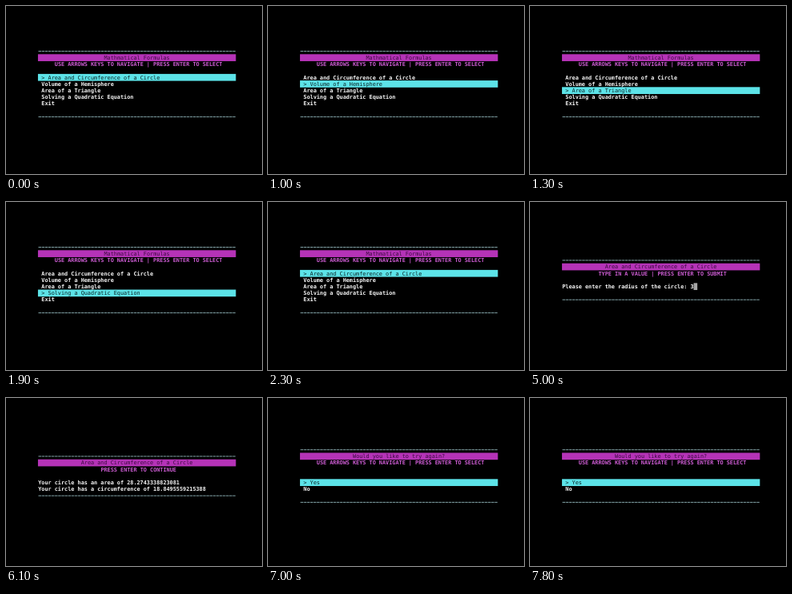
Animation, 320 px wide and 210 px high, one loop 8000 ms. Source, as an HTML page:

```html
<!DOCTYPE html>
<html lang="en">
<head>
<meta charset="utf-8">
<title>Terminal formulas</title>
<style>
  html, body { margin: 0; width: 100%; height: 100%; overflow: hidden; background: #000; }
  svg { display: block; width: 320px; height: 210px; }
  text {
    font: 6.835px "DejaVu Sans Mono", monospace;
    white-space: pre;
    text-rendering: geometricPrecision;
  }
  .bold { font-weight: bold; }
</style>
</head>
<body>
<svg id="stage" viewBox="0 0 320 210"></svg>
<script>
const LOOP = 8000;
const COLS = 60, LEFT = 40.2, TOP = 52.3, CELL = 4.115, ROW = 8.21;
const BLEED = 0.25; // highlights reach slightly past their cells
const MAGENTA = "#b533b7", PINK = "#cc5cd2", CYAN = "#5ce3e8";
const WHITE = "#f6f6f6", RULE = "#83a4a8", INK = "#0a2426", TITLE_INK = "#3c0a40";

const NAVIGATE = "USE ARROWS KEYS TO NAVIGATE | PRESS ENTER TO SELECT";
const CIRCLE = "Area and Circumference of a Circle";
const FORMULAS = [
  CIRCLE,
  "Volume of a Hemisphere",
  "Area of a Triangle",
  "Solving a Quadratic Equation",
  "Exit"
];
const PROMPT = "Please enter the radius of the circle: ";
const DOWN_KEYS = [1000, 1300, 1600, 2000, 2300];
const ENTER = 3500, TYPED = 5000, RESULT = 5300, AGAIN = 6900;

const stage = document.getElementById("stage");
const px = n => n.toFixed(2);

function put(row, col, str, fill, bold) {
  const safe = str.replace(/&/g, "&amp;").replace(/</g, "&lt;").replace(/>/g, "&gt;");
  return `<text x="${px(LEFT + col * CELL)}" y="${px(TOP + row * ROW + 6.4)}" ` +
    `fill="${fill}"${bold ? ' class="bold"' : ""}>${safe}</text>`;
}

function block(row, col, cols, fill) {
  return `<rect x="${px(LEFT + col * CELL - BLEED)}" y="${px(TOP + row * ROW - BLEED)}" ` +
    `width="${px(cols * CELL + 2 * BLEED)}" height="${px(ROW + 2 * BLEED)}" fill="${fill}"/>`;
}

// One dash per column, with a narrow gap between neighbours
function rule(row) {
  const gap = 0.6;
  return `<path d="M${px(LEFT + gap / 2)} ${px(TOP + row * ROW + 4.2)}h${px(COLS * CELL - gap)}" ` +
    `stroke="${RULE}" stroke-dasharray="${CELL - gap} ${gap}"/>`;
}

const centre = str => Math.ceil((COLS - str.length) / 2);

function panel(first, last, title, hint) {
  return rule(first) +
    block(first + 1, 0, COLS, MAGENTA) +
    put(first + 1, centre(title), title, TITLE_INK) +
    put(first + 2, centre(hint), hint, PINK, true) +
    rule(last);
}

// The highlight goes beneath every label
function list(row, items, chosen) {
  return block(row + chosen, 0, COLS, CYAN) + items.map((item, i) => i === chosen
    ? put(row + i, 1, "> " + item, INK)
    : put(row + i, 1, item, WHITE, true)).join("");
}

function screen(t) {
  if (t < ENTER) {
    const presses = DOWN_KEYS.filter(k => t >= k).length;
    return panel(0, 10, "Mathmatical Formulas", NAVIGATE) +
      list(4, FORMULAS, presses % FORMULAS.length);
  }
  if (t < RESULT) {
    const line = PROMPT + (t >= TYPED ? "3" : "");
    return panel(2, 8, CIRCLE, "TYPE IN A VALUE | PRESS ENTER TO SUBMIT") +
      put(6, 0, line, WHITE, true) +
      block(6, line.length, 1, "#a6a6a6");
  }
  if (t < AGAIN) {
    return panel(2, 8, CIRCLE, "PRESS ENTER TO CONTINUE") +
      put(6, 0, "Your circle has an area of 28.2743338823081", WHITE, true) +
      put(7, 0, "Your circle has a circumference of 18.8495559215388", WHITE, true);
  }
  return panel(1, 9, "Would you like to try again?", NAVIGATE) +
    list(6, ["Yes", "No"], 0);
}

let shown = "";
function draw() {
  const next = screen(performance.now() % LOOP);
  if (next !== shown) stage.innerHTML = shown = next;
  requestAnimationFrame(draw);
}
draw();
</script>
</body>
</html>
```
